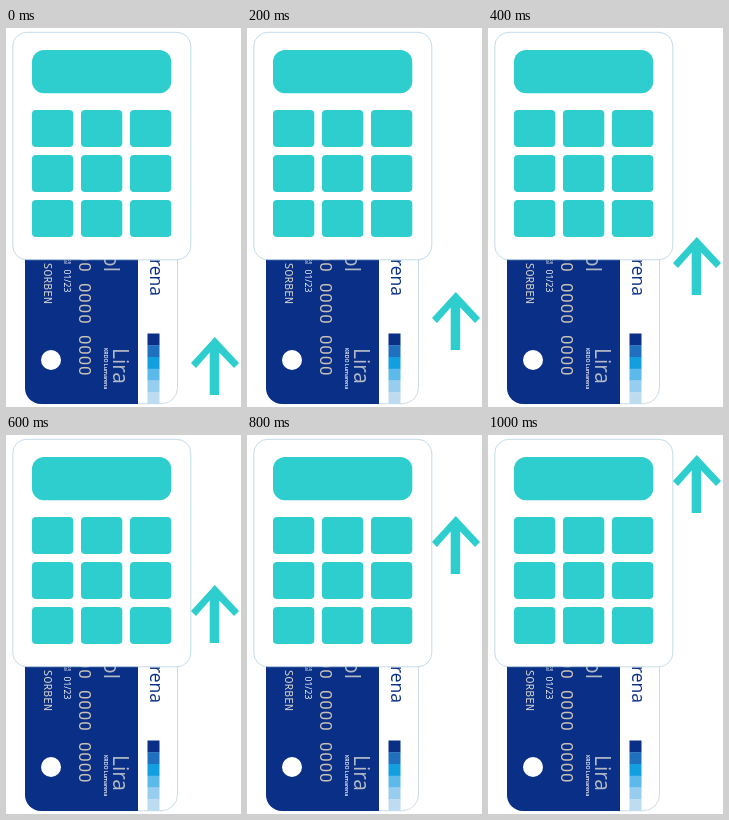
Animation, 235 px wide and 379 px high, one loop 1.2 s. Source, as an HTML page:

```html
<!DOCTYPE html>
<html lang="es">
<head>
<meta charset="utf-8">
<style>
  html, body { margin: 0; width: 100%; height: 100%; overflow: hidden; background: #fff; }
  svg { display: block; width: 100%; height: 100%; }
  text { font-family: "Open Sans", sans-serif; fill: #fff; }
  .end { text-anchor: end; }
  .bank { font-size: 17.5px; font-weight: 500; fill: #0a2f87; }
  .silver { font-size: 21px; fill: #b3bac6; }
  .tiny { font-size: 4.5px; }
  .number { font: 16.9px Roboto, sans-serif; fill: #c9c2b4; letter-spacing: .9px; word-spacing: 5.3px; }
  .holder { font: 11.5px "Noto Sans Mono", monospace; fill: #d6d2cb; }
</style>
</head>
<body>
<svg viewBox="0 0 235 379">
  <clipPath id="card"><rect x="19" y="180" width="152.5" height="196" rx="16"/></clipPath>
  <rect x="19.5" y="180" width="152" height="195.7" rx="16" fill="#fff" stroke="#a9c3d6" stroke-width=".6"/>
  <g clip-path="url(#card)">
    <path fill="#0a2f87" d="M19 180h113v197h-113z"/>
    <g id="stripes"></g>
    <text class="bank end" transform="translate(144 268) rotate(90)">Lumarena</text>
    <text class="silver end" transform="translate(98 244) rotate(90)">Crisol</text>
    <text class="silver" transform="translate(106.500 320) rotate(90)">Lira</text>
    <text font-size="5.2" font-weight="600" transform="translate(98 320) rotate(90)">KRDO Lumarena</text>
    <text class="number end" transform="translate(73 348.500) rotate(90)">0000 0000 0000</text>
    <text class="tiny end" transform="translate(62 236) rotate(90)">Vence</text>
    <text class="tiny end" transform="translate(57.500 236) rotate(90)">al</text>
    <text font-size="8.6" transform="translate(57.800 241.500) rotate(90)">01/23</text>
    <text class="holder end" transform="translate(37.500 276) rotate(90)">SORBEN</text>
    <circle cx="45" cy="332" r="10" fill="#fff"/>
  </g>
  <rect x="6.8" y="4.3" width="178" height="227.500" rx="14" fill="#fff" stroke="#9dc3d8" stroke-width=".6"/>
  <g fill="#2ecdce">
    <rect x="26" y="22" width="139.300" height="43.300" rx="12"/>
    <g id="keys"></g>
    <path id="arrow" d="M208.800 0L233 26 228 31 213.200 15.500V58H203.700V15.500L190 31 185 26Z"/>
  </g>
</svg>
<script>
  const byId = id => document.getElementById(id);

  function addRect(parent, attrs) {
    const rect = document.createElementNS("http://www.w3.org/2000/svg", "rect");
    for (const name in attrs) rect.setAttribute(name, attrs[name]);
    parent.append(rect);
  }

  for (let i = 0; i < 9; i++) {
    addRect(byId("keys"), {
      x: 26 + i % 3 * 49, y: 82 + Math.floor(i / 3) * 45,
      width: 41.3, height: 37, rx: 4
    });
  }

  ["#0a2f87", "#1f70be", "#129fe0", "#5bbaea", "#97cdee", "#bddcf0"].forEach((fill, i) =>
    addRect(byId("stripes"), { x: 141.5, y: 305.5 + i * 11.75, width: 12, height: 12, fill }));

  // The arrow jumps upward, holding each height for one step.
  const STEP = 200;
  const heights = [309, 264, 209, 150, 81, 20];

  function draw() {
    const step = Math.floor(performance.now() / STEP) % heights.length;
    byId("arrow").setAttribute("transform", `translate(0 ${heights[step]})`);
    requestAnimationFrame(draw);
  }
  draw();
</script>
</body>
</html>
```
